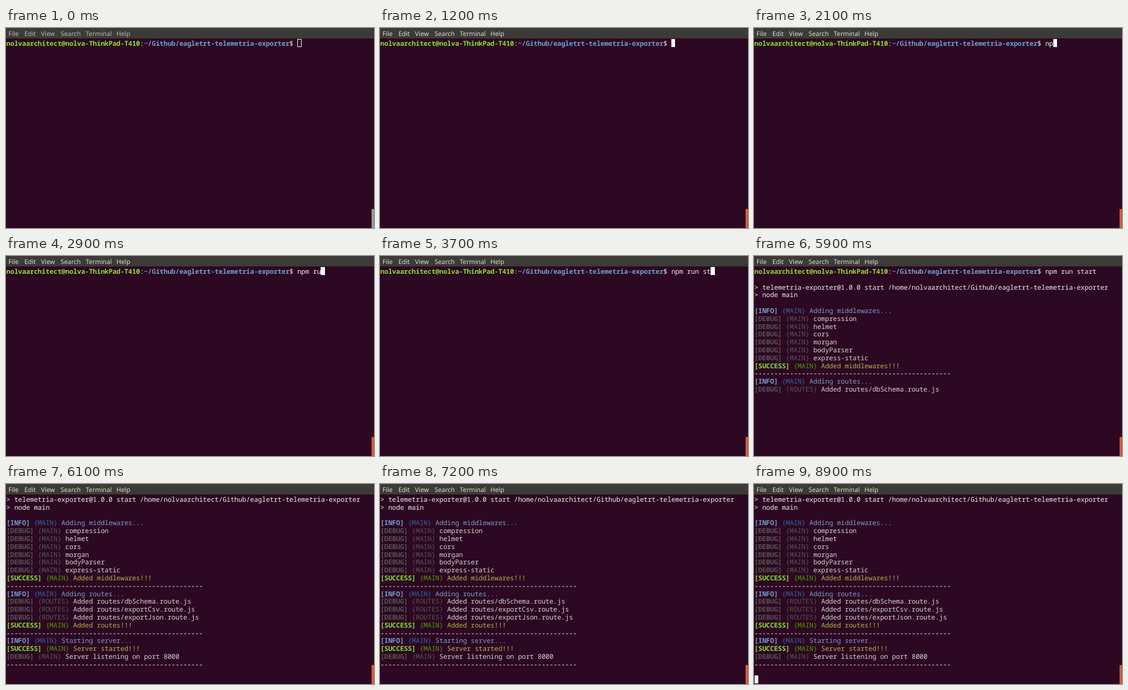
These frames come from a looping animation (600x326 px, 9400 ms). An HTML page:

```html
<!DOCTYPE html>
<html lang="en">
<head>
<meta charset="utf-8">
<title>Terminal session</title>
<style>
  html, body { margin: 0; width: 100%; height: 100%; overflow: hidden; }
  body { position: relative; background: #2d0822; text-rendering: geometricPrecision; }
  #menu {
    position: absolute; z-index: 1; left: 0; top: 0; width: 100%; height: 17px;
    background: #3c3b37; color: #dfdbd2; font: 10.4px/17px "Noto Sans", "Open Sans", sans-serif;
  }
  #menu span { position: absolute; top: 1.5px; }
  #screen {
    position: absolute; left: 0.6px; top: 20px;
    font: 10.9px/12.8px "Noto Sans Mono", "DejaVu Sans Mono", monospace; color: #eeeeec;
  }
  #screen span { position: absolute; white-space: pre; }
  #cursor {
    position: absolute; box-sizing: border-box; margin-top: -2px;
    width: 6.5px; height: 13px; background: #fff;
  }
  #thumb { position: absolute; right: 0; top: 295px; width: 4px; height: 31px; background: #cf5c38; }
  .blurred #menu { color: #bdb9b1; }
  .blurred #cursor { background: none; border: 1px solid #eeeeec; width: 7px; }
  .blurred #thumb { background: #9d9598; }
  .b { font-weight: 700; }
  .green { color: #8ae234; }
  .blue { color: #729fcf; }
  .navy { color: #3465a4; }
  .grey { color: #555753; }
  .leaf { color: #4e9a06; }
  .olive { color: #b3b44e; }
  .sky { color: #7b9ec9; }
  .pale { color: #d3d7cf; }
</style>
</head>
<body>
<div id="menu">
  <span style="left:4px">File</span><span style="left:30px">Edit</span>
  <span style="left:57px">View</span><span style="left:89px">Search</span>
  <span style="left:130px">Terminal</span><span style="left:180px">Help</span>
</div>
<div id="screen"><div id="cursor"></div></div>
<div id="thumb"></div>
<script>
const LOOP = 9400, CELL = 6.41, ROW = 12.8, TOP = 20, BLINK = 600;
const FOCUS = 1100, ENTER = 5200, OUTPUT = 5600, READY = 6500;
const COMMAND = 'npm run start';
const KEYS = [2000, 2100, 2200, 2300, 2500, 2800, 3000, 3200, 3500, 3700, 3800, 4000, 4200];
// [time, rows visible, rows scrolled away]
const PRINTS = [[0, 1, 0], [OUTPUT, 4, 0], [5800, 14, 0], [5900, 16, 0], [6000, 20, 0], [6100, 24, 2]];

const screen = document.getElementById('screen');
const cursor = document.getElementById('cursor');

const log = (level, tag, text, head, mid, body) =>
  [[`[${level}]`, 'b ' + head], [` {${tag}}`, mid], [' ' + text, body]];
const info = text => log('INFO', 'MAIN', text, 'blue', 'navy', 'sky');
const debug = (text, tag = 'MAIN') => log('DEBUG', tag, text, 'grey', 'grey', 'pale');
const success = text => log('SUCCESS', 'MAIN', text, 'green', 'leaf', 'olive');
const plain = text => [[text, '']];
const rule = plain('-'.repeat(50));
const route = name => debug(`Added routes/${name}.route.js`, 'ROUTES');

const prompt = [
  ['nolvaarchitect@nolva-ThinkPad-T410', 'b green'], [':', ''],
  ['~/Github/eagletrt-telemetria-exporter', 'b blue'], ['$ ', '']
];
const promptCols = prompt.reduce((n, [text]) => n + text.length, 0);

const lines = [
  [...prompt, ['', '']],
  [],
  plain('> telemetria-exporter@1.0.0 start /home/nolvaarchitect/Github/eagletrt-telemetria-exporter'),
  plain('> node main'),
  [],
  info('Adding middlewares...'),
  ...['compression', 'helmet', 'cors', 'morgan', 'bodyParser', 'express-static'].map(s => debug(s)),
  success('Added middlewares!!!'),
  rule,
  info('Adding routes...'),
  ...['dbSchema', 'exportCsv', 'exportJson'].map(route),
  success('Added routes!!!'),
  rule,
  info('Starting server...'),
  success('Server started!!!'),
  debug('Server listening on port 8000'),
  rule
];

function addSpan(parent, text, style) {
  const span = document.createElement('span');
  span.textContent = text;
  span.className = style;
  return parent.appendChild(span);
}

// Fit the font's advance to the terminal grid
const probe = addSpan(screen, '0'.repeat(100), '');
screen.style.letterSpacing = CELL - probe.getBoundingClientRect().width / 100 + 'px';
probe.remove();

const rows = lines.map((parts, i) => {
  const row = document.createElement('div');
  let col = 0;
  for (const [text, style] of parts) {
    const span = addSpan(row, text, style);
    span.style.left = col * CELL + 'px';
    span.style.top = i * ROW + 'px';
    col += text.length;
  }
  return screen.appendChild(row);
});
const typed = rows[0].lastChild;

function cursorState(t, count) {
  if (t < ENTER) {
    const since = t < FOCUS ? t : count ? KEYS[count - 1] : FOCUS;
    return { col: promptCols + count, row: 0, since, steady: t < FOCUS };
  }
  if (t < OUTPUT) return { col: 0, row: 1, since: ENTER };
  return { col: 0, row: 25, since: READY };
}

function draw() {
  const t = performance.now() % LOOP;
  const count = KEYS.filter(k => k <= t).length;
  const [, shown, scrolled] = PRINTS.filter(p => p[0] <= t).pop();
  const { col, row, since, steady } = cursorState(t, count);
  const lit = steady || (t >= since && Math.floor((t - since) / BLINK) % 2 === 0);

  document.body.classList.toggle('blurred', t < FOCUS);
  typed.textContent = COMMAND.slice(0, count);
  rows.forEach((el, i) => { el.style.display = i < shown ? '' : 'none'; });
  screen.style.top = TOP - scrolled * ROW + 'px';
  cursor.style.left = col * CELL + 'px';
  cursor.style.top = row * ROW + 'px';
  cursor.style.visibility = lit ? 'visible' : 'hidden';
  requestAnimationFrame(draw);
}
draw();
</script>
</body>
</html>
```
